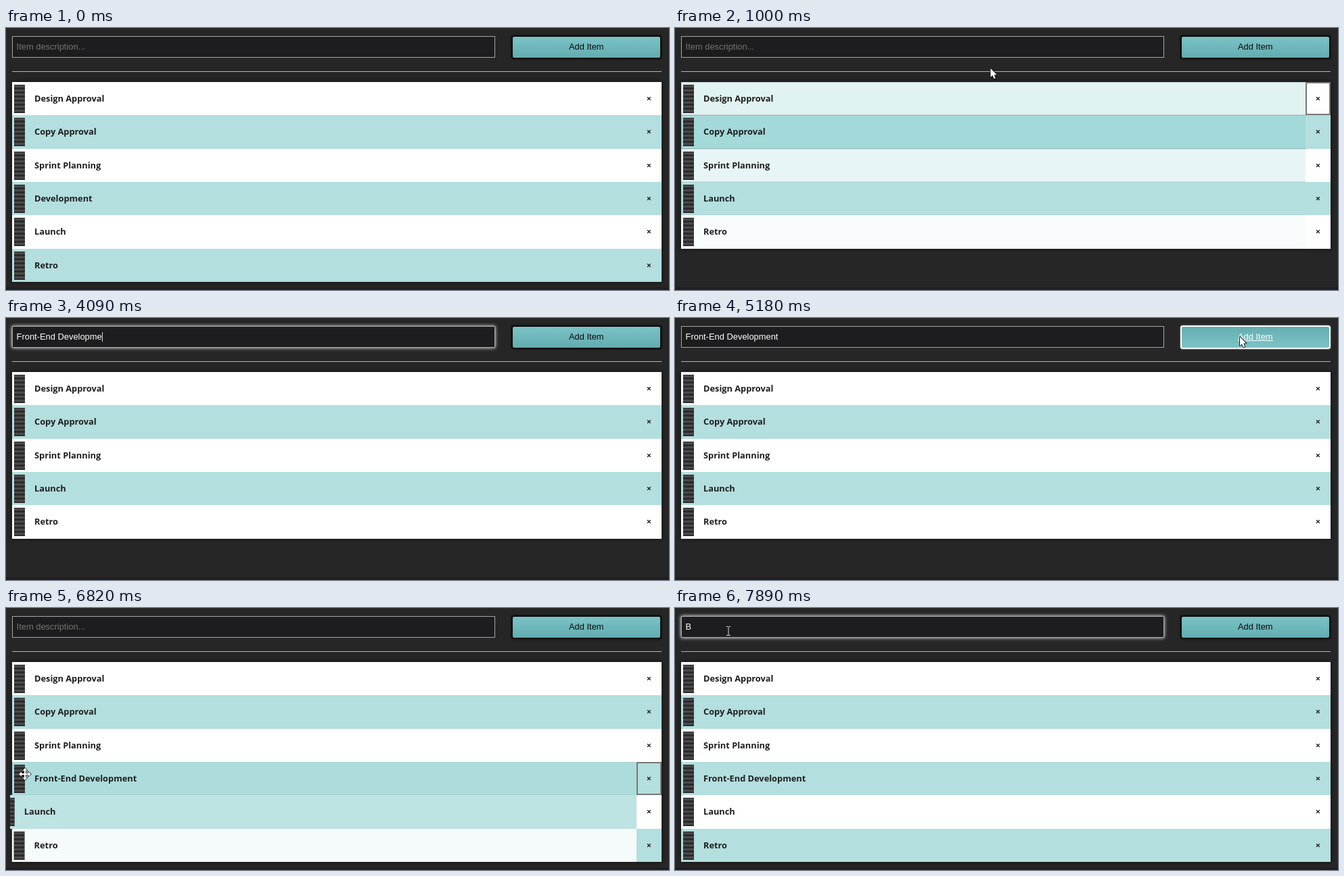
Recreate the animation shown at these times as an HTML page with a canvas. Size 980x388 px, loop 8 s.

```html
<!DOCTYPE html>
<html lang="en">
<head>
<meta charset="utf-8">
<title>Sortable list</title>
<style>
  html, body { margin: 0; width: 100%; height: 100%; overflow: hidden; background: #262626; }
  canvas { display: block; }
</style>
</head>
<body>
<canvas id="stage" width="980" height="388"></canvas>
<script>
const ctx = document.getElementById('stage').getContext('2d');
const LOOP = 8000, DELETE = 835, ADD = 5240, DRAG = 6110, DROP = 6815;
const LEFT = 9, RIGHT = 969, CELL = 932, ROW = 49.33, TOP = 80;
const WHITE = [255, 255, 255], TEAL = [179, 223, 222], HOVER = [133, 203, 206];
const UI_FONT = '12.9px "Liberation Sans", Arial, sans-serif';
const LIST_FONT = 'bold 12.8px "Open Sans", sans-serif';

const BASE = ['Design Approval', 'Copy Approval', 'Sprint Planning'];
const NEW_ITEM = 'Front-End Development';

// time, x, y, ease-out flag for the move that ends here
const PATH = [
  [70, 956, 379], [600, 950, 254, 1], [840, 948, 252], [1000, 467, 60],
  [1450, 337, 29, 1], [4410, 337, 29], [4900, 835, 28, 1], [5240, 835, 28],
  [5480, 596, 125], [5860, 19, 350, 1], [DRAG, 19, 350], [6680, 28, 246],
  [6830, 28, 246], [7250, 58, 58], [7590, 79, 34, 1], [LOOP, 79, 34]
];

// time and number of characters typed so far
const KEYS = [
  [1930, 1], [2010, 2], [2090, 3], [2170, 4], [2260, 5], [2480, 6], [2670, 7],
  [2840, 8], [2920, 9], [3000, 10], [3260, 11], [3340, 12], [3420, 13], [3490, 14],
  [3570, 15], [3700, 16], [3840, 17], [3920, 18], [4090, 19], [4125, 20], [4160, 21]
];

const clamp = v => Math.max(0, Math.min(1, v));
const ramp = (t, a, b) => clamp((t - a) / (b - a));
const mix = (a, b, k) => a.map((v, i) => v + (b[i] - v) * k);
const rgb = c => `rgb(${c.map(Math.round)})`;
const rowTop = i => Math.round(TOP + ROW * i);
const inInput = (x, y) => x > LEFT && x < 723 && y > 12 && y < 44;

function cursorAt(t) {
  const next = PATH.findIndex(p => p[0] > t);
  if (next < 1) return PATH[0].slice(1, 3);
  const [t0, x0, y0] = PATH[next - 1], [t1, x1, y1, eased] = PATH[next];
  let k = (t - t0) / (t1 - t0);
  if (eased) k = 1 - (1 - k) ** 2;
  return [x0 + (x1 - x0) * k, y0 + (y1 - y0) * k];
}

function itemsAt(t) {
  if (t < DELETE) return [...BASE, 'Development', 'Launch', 'Retro'];
  if (t < ADD) return [...BASE, 'Launch', 'Retro'];
  if (t < DROP) return [...BASE, 'Launch', 'Retro', NEW_ITEM];
  return [...BASE, NEW_ITEM, 'Launch', 'Retro'];
}

// The page reacts a little after the pointer moves.
function rowUnderCursor(t) {
  if (t < 115) return -1;
  const [x, y] = cursorAt(t - 45);
  return x < LEFT || x > RIGHT || y < TOP ? -1 : Math.floor((y - TOP) / ROW);
}

// Replays the recent past so that colour and offset transitions depend on time only.
function rowStates(t) {
  const states = {}, step = 10, rate = 0.13;
  for (let s = Math.max(0, t - 400); ; s = Math.min(t, s + step)) {
    const over = rowUnderCursor(s), dragging = s >= DRAG && s < DROP;
    itemsAt(s).forEach((name, i) => {
      const hovered = over === i && !dragging;
      const tint = hovered ? HOVER : i % 2 ? TEAL : WHITE;
      const shift = dragging && over === i && name !== NEW_ITEM ? 18 : 0;
      const st = states[name] ||= { tint, glow: +hovered, shift };
      st.tint = mix(st.tint, tint, rate);
      st.glow += (hovered - st.glow) * rate;
      st.shift += (shift - st.shift) * rate;
      st.hovered = hovered;
    });
    if (s >= t) return states;
  }
}

function rect(x, y, w, h, fill) {
  ctx.fillStyle = fill;
  ctx.fillRect(x, y, w, h);
}

function frame(x, y, w, h, color, width = 1) {
  ctx.strokeStyle = color;
  ctx.lineWidth = width;
  ctx.strokeRect(x + width / 2, y + width / 2, w - width, h - width);
}

function text(str, x, y, font, color) {
  ctx.font = font;
  ctx.fillStyle = color;
  ctx.fillText(str, x, y);
}

function withShadow(color, blur, draw) {
  ctx.save();
  ctx.shadowColor = color;
  ctx.shadowBlur = blur;
  draw();
  ctx.restore();
}

function drawHandle(x, y) {
  rect(x, y, 16, 42, '#2b2b2b');
  for (let i = 0; i < 7; i++) rect(x, y + 1 + i * 6, 16, 3, 'rgba(255,255,255,.15)');
}

function drawRow(name, i, st) {
  const y = rowTop(i), h = rowTop(i + 1) - y;
  const left = Math.max(6, LEFT - st.shift);
  ctx.save();
  ctx.beginPath();
  ctx.rect(left, y, RIGHT - left, h);
  ctx.clip();
  rect(left, y, CELL - left, h, rgb(st.tint));
  drawHandle(12 - st.shift, y + 4);
  text(name, 42 - st.shift, y + 29, LIST_FONT, '#1e1e1e');
  if (st.glow > 0.02) frame(left, y, CELL + 1 - left, h, `rgba(120,128,128,${st.glow})`);
  rect(CELL, y, RIGHT - CELL, h, rgb(i % 2 ? TEAL : WHITE));
  if (st.hovered) frame(CELL, y, RIGHT - CELL, h, '#777', 2);
  ctx.textAlign = 'center';
  text('×', 950.5, y + 29, LIST_FONT, '#1e1e1e');
  ctx.restore();
}

function drawList(t) {
  const items = itemsAt(t), states = rowStates(t);
  withShadow('rgba(0,0,0,.6)', 7, () =>
    rect(LEFT, TOP, RIGHT - LEFT, rowTop(items.length) - TOP, '#fff'));
  items.forEach((name, i) => drawRow(name, i, states[name]));
}

function drawGhost(t) {
  if (t < DRAG + 40 || t >= DROP - 40) return;
  const [cx, cy] = cursorAt(t), x = cx - 10, y = cy - 23;
  const fade = ctx.createLinearGradient(x, 0, x + 320, 0);
  fade.addColorStop(0, 'rgba(133,203,206,.6)');
  fade.addColorStop(1, 'rgba(133,203,206,0)');
  rect(x, y, 320, 49, fade);
  ctx.save();
  ctx.globalAlpha = 0.5;
  drawHandle(x + 3, y + 4);
  text(NEW_ITEM, x + 33, y + 29, LIST_FONT, '#1e1e1e');
  ctx.restore();
}

function typedAt(t) {
  if (t >= 7890) return 'B';
  if (t >= ADD) return '';
  return NEW_ITEM.slice(0, KEYS.reduce((n, [at, count]) => t >= at ? count : n, 0));
}

function drawInput(t) {
  const focus = ramp(t, 1540, 1720) - ramp(t, 5020, 5120) + ramp(t, 7590, 7730);
  if (focus > 0) {
    withShadow(`rgba(255,255,255,${focus})`, 5, () => rect(LEFT, 12, 714, 32, '#1d1d1f'));
  }
  rect(LEFT, 12, 714, 32, '#1d1d1f');
  frame(LEFT, 12, 714, 32, '#a6a6a6');
  const value = typedAt(t);
  text(value || 'Item description...', 15.6, 32, UI_FONT, value ? '#fff' : '#77746e');
  if (value && t < 4160) rect(Math.round(15.6 + ctx.measureText(value).width), 21, 1, 14, '#ddd');
}

function drawButton(t) {
  const active = t >= 4860 && t < 6180;
  const fill = ctx.createLinearGradient(0, 12, 0, 45);
  fill.addColorStop(0, active ? '#64adb1' : '#7ac3c6');
  fill.addColorStop(1, active ? '#7cc4c8' : '#62abaf');
  ctx.beginPath();
  ctx.roundRect(748, 12, 220, 33, 3);
  ctx.lineWidth = 2;
  ctx.strokeStyle = active ? '#fff' : '#0c0c0c';
  withShadow(active ? 'rgba(255,255,255,.4)' : 'rgba(0,0,0,.8)', 3, () => ctx.stroke());
  ctx.fillStyle = fill;
  ctx.fill();
  ctx.stroke();
  const color = active ? '#fff' : '#0a0a0a';
  text('Add Item', 832, 32, UI_FONT, color);
  if (active) rect(832, 33, 52, 1, color);
}

function polygon(points, fill, stroke, width = 1) {
  ctx.beginPath();
  points.forEach(([x, y]) => ctx.lineTo(x, y));
  ctx.closePath();
  ctx.lineJoin = 'round';
  ctx.lineWidth = width;
  ctx.strokeStyle = stroke;
  ctx.stroke();
  ctx.fillStyle = fill;
  ctx.fill();
}

function drawArrow() {
  polygon([[0, 0], [0, 13], [3, 10.4], [5.2, 15.4], [7.4, 14.4], [5.3, 9.6], [9.4, 9.4]],
    '#fff', '#000', 1.6);
}

function drawBeam() {
  ctx.fillStyle = '#ddd';
  ctx.fillRect(-0.5, -6, 1, 13);
  for (const y of [-7, 6]) {
    ctx.fillRect(-3, y, 2.5, 1);
    ctx.fillRect(0.5, y, 2.5, 1);
  }
}

function drawMove() {
  const arm = [[-1, -1], [-1, -5], [-3.5, -5], [0, -9], [3.5, -5], [1, -5], [1, -1]];
  const quarter = (x, y, n) => n ? quarter(-y, x, n - 1) : [x, y];
  const shape = [0, 1, 2, 3].flatMap(n => arm.map(([x, y]) => quarter(x, y, n)));
  polygon(shape, '#fff', '#222', 1.6);
}

function drawCursor(t) {
  if (t < 70 || (t >= 3080 && t < 4410)) return;
  const [x, y] = cursorAt(t);
  const onHandle = x > 9 && x < 30 && y > TOP;
  ctx.save();
  ctx.translate(x, y);
  if (inInput(x, y)) drawBeam();
  else if (onHandle) drawMove();
  else drawArrow();
  ctx.restore();
}

function draw(t) {
  rect(0, 0, 980, 388, '#262626');
  rect(0, 384, 980, 4, '#202020');
  drawInput(t);
  drawButton(t);
  rect(LEFT, 64, RIGHT - LEFT, 1, '#b4b4b4');
  drawList(t);
  drawGhost(t);
  drawCursor(t);
}

const start = performance.now();
function tick() {
  draw((performance.now() - start) % LOOP);
  requestAnimationFrame(tick);
}
tick();
</script>
</body>
</html>
```
